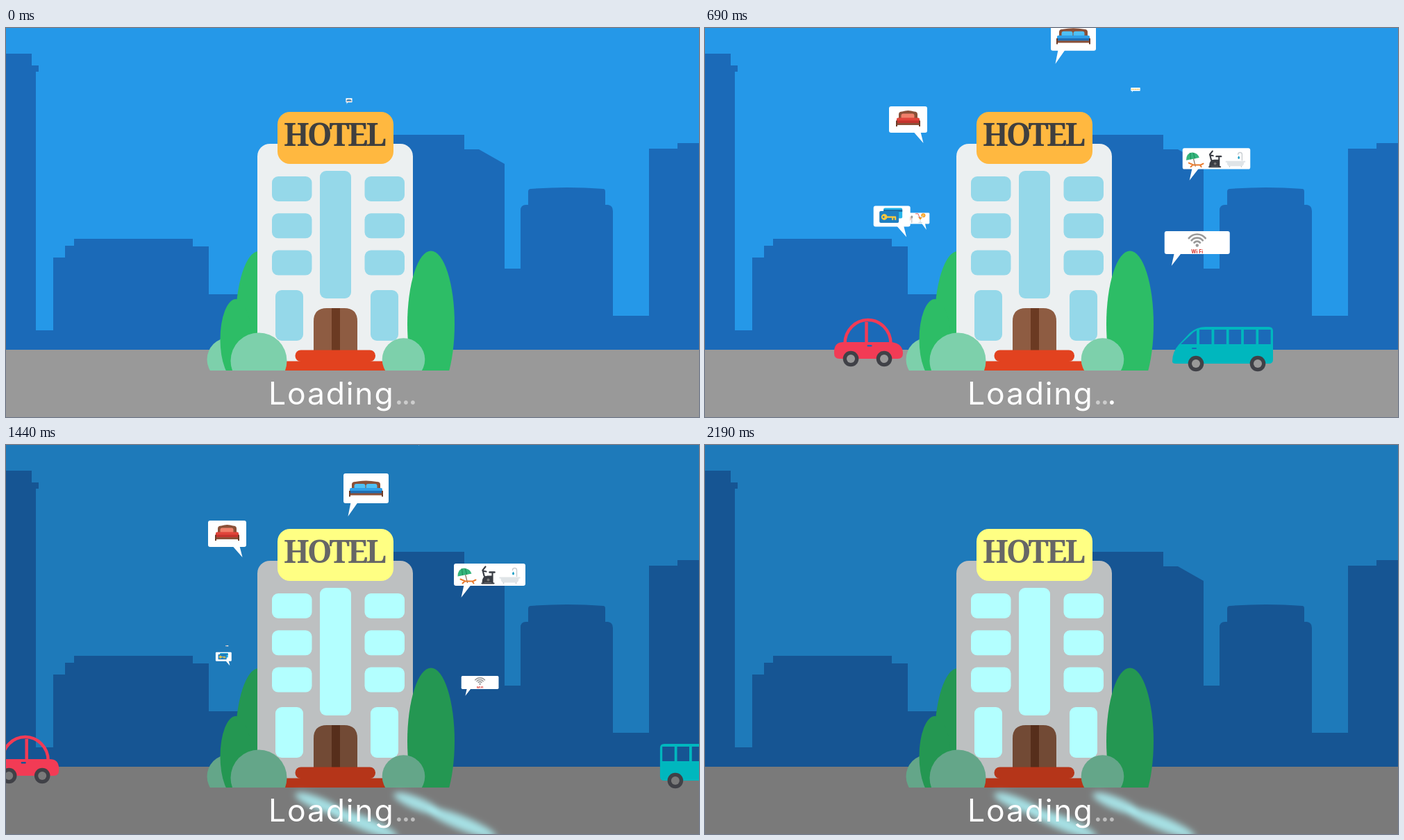
An HTML page for the animation above (2220 ms loop, 998x561 px).

```html
<!DOCTYPE html>
<html lang="en">
<head>
<meta charset="utf-8">
<title>Hotel loading</title>
<style>
html, body { margin: 0; width: 100%; height: 100%; overflow: hidden; }
svg { display: block; width: 100vw; height: 100vh; }
.sky { fill: var(--sky); }
.town { fill: var(--town); }
.ground { fill: var(--ground); }
.tree { fill: var(--tree); }
.bush { fill: var(--bush); }
.wall { fill: var(--wall); }
.step { fill: var(--step); }
.door { fill: var(--door); }
.slit { fill: var(--slit); }
.board { fill: var(--board); }
.tyre { fill: #404147; }
.name { fill: var(--name); font: bold 45px "Noto Serif", "Liberation Serif", serif; letter-spacing: -2.9px; }
.load { fill: #fff; font: 400 44.5px Inter, "Open Sans", sans-serif; letter-spacing: 1.8px; }
.dot { letter-spacing: -2.8px; }
.wifi { fill: #d8322a; font: bold 7px Inter, sans-serif; }
</style>
</head>
<body>
<svg viewBox="0 0 998 561" preserveAspectRatio="none">
  <defs>
    <filter id="blur" x="-20%" y="-40%" width="140%" height="180%"><feGaussianBlur stdDeviation="5"/></filter>
    <clipPath id="lawn"><rect width="998" height="494"/></clipPath>
  </defs>
  <rect class="sky" width="998" height="561"/>
  <path class="town" d="M0 37H37V54H47V63H43V436H68V331H85V314H98V304H269V315H292V384H400V154H660V175H681L718 196V347H741V263Q741 255 749 255H752V236Q752 232 756 232Q808 228 860 232Q863 232 863 236V255H867Q874 256 874 264V415H926V174H967V166H998V465H0Z"/>
  <rect class="ground" y="464" width="998" height="97"/>
  <g clip-path="url(#lawn)">
    <circle class="bush" cx="321" cy="478" r="31.5"/>
    <ellipse class="tree" cx="364" cy="427" rx="33.5" ry="105"/>
    <ellipse class="tree" cx="331" cy="449" rx="22.5" ry="58"/>
    <rect class="wall" x="362" y="167" width="224" height="340" rx="18"/>
    <ellipse class="tree" cx="612" cy="427" rx="34" ry="105.5"/>
    <g id="panes"></g>
    <path class="door" d="M443 465V423Q443 404 462 404H487Q506 404 506 423V465Z"/>
    <rect class="slit" x="469" y="404" width="12" height="61"/>
    <rect class="step" x="395" y="480.5" width="155" height="14"/>
    <rect class="step" x="416.5" y="464.5" width="115.5" height="16.5" rx="8"/>
    <circle class="bush" cx="364" cy="480" r="40.5"/>
    <circle class="bush" cx="572.5" cy="478" r="30.8"/>
  </g>
  <rect class="board" x="391" y="121" width="167" height="75" rx="18"/>
  <text class="name" x="400" y="170">HOTEL</text>
  <g id="glow" filter="url(#blur)" fill="#b2fbff"></g>
  <text class="load" x="378" y="543">Loading<tspan class="dot">.</tspan><tspan class="dot">.</tspan><tspan class="dot">.</tspan></text>
  <g id="car">
    <path d="M-34 -6A33 34 0 0 1 32 -6M-3 -37V-6" fill="none" stroke="#f23b55" stroke-width="4.5"/>
    <path d="M-49.5 5Q-49 -8 -36 -8H33Q49.5 -6 49.5 8Q49.5 16 42 16H-42Q-49.5 16 -49.5 8Z" fill="#f23b55"/>
    <rect class="town" x="-2" y="-4" width="7" height="2.5" rx="1"/>
  </g>
  <g id="bus"></g>
  <g id="bubbles"></g>
</svg>
<script>
const LOOP = 2220, POP = 250, DRIFT = 110, SHRINK = 150, RISE = .33;
const $ = id => document.getElementById(id);
const root = document.documentElement.style;
const clamp = v => Math.max(0, Math.min(1, v));
const mix = (a, b, u) => a + (b - a) * u;
const ease = u => u * u * (3 - 2 * u);
const repeat = (n, fn) => Array.from({ length: n }, (_, i) => fn(i)).join('');

const day = {
  sky: '2598e8', town: '1b6ab8', ground: '999999', tree: '2dbd66', bush: '7dd0ab', wall: 'ecf0f1',
  glass: '95d8e9', step: 'e2421f', door: '8e5c42', slit: '6b3a22', board: 'ffb840', name: '3f3f3f'
};
// at night all colours dim, lit things brighten
const lit = { glass: 1.2, board: 2.05, name: 1.62 };

const rect = (x, y, w, h, fill, r = 0) => `<rect x="${x}" y="${y}" width="${w}" height="${h}" rx="${r}" fill="${fill}"/>`;
const disc = (x, y, r, fill) => `<circle cx="${x}" cy="${y}" r="${r}" fill="${fill}"/>`;
const shape = (d, fill) => `<path d="${d}" fill="${fill}" fill-rule="evenodd"/>`;
const line = (d, color, w) => `<path d="${d}" fill="none" stroke="${color}" stroke-width="${w}" stroke-linecap="round"/>`;

const pane = (x, y, w, h) => rect(x, y, w, h, 'var(--glass)', 9);
$('panes').innerHTML = repeat(3, i => pane(383, 214 + 53.3 * i, 57.5, 36) + pane(516.5, 214 + 53.3 * i, 57.5, 36)) +
  pane(452, 206, 45, 184) + pane(388, 378, 40, 73) + pane(525, 378, 40, 73);

$('glow').innerHTML = repeat(4, i => {
  const low = i >> 1, x = 450 + 142 * (i % 2) + 64 * low, y = 517 + 28 * low;
  return `<ellipse rx="${36 + 18 * low}" ry="${9 + low}" opacity=".8" transform="translate(${x} ${y}) rotate(22)"/>`;
});

const wheel = (x, y) => `<circle class="tyre" cx="${x}" cy="${y}" r="11.3"/><circle class="ground" cx="${x}" cy="${y}" r="6"/>`;
$('car').innerHTML += wheel(-25.5, 16) + wheel(22.5, 16);
$('bus').innerHTML = shape('M-73 20Q-73 6 -64 -4L-48 -21Q-38 -30 -25 -30H66Q72 -30 72 -24V17Q72 23 66 23H-68Q-73 23 -73 20ZM-61 -5H-38V-25Q-42 -23 -46 -19Z' +
  repeat(5, i => `M${-34 + 21.3 * i} -5h17.5v-21h-17.5Z`), '#00b7be') +
  rect(-45, 0, 7, 2, 'var(--town)', 1) + wheel(-39, 23) + wheel(50, 23);

function bed(w, sheet, dark, pillow, count) {
  const pw = (2 * w - 15) / count;
  return shape(`M${4 - w} -4V-15q0 -4 5 -4 ${w - 9} -3 ${2 * w - 18} 0 5 0 5 4V-4Z`, '#8a5038') +
    repeat(count, i => rect(7.5 - w + pw * i, -16, pw - 1, 8, pillow, 3)) +
    rect(1 - w, -10, 2 * w - 2, 6, sheet, 2) + rect(1 - w, -6, 2 * w - 2, 4, dark) +
    rect(-w, -2.5, 2 * w, 3, '#8a5038') + rect(-w, -6, 2, 8.5, '#6d3b28') + rect(w - 2, -6, 2, 8.5, '#6d3b28');
}

function star(x, y, r) {
  const d = repeat(10, i => {
    const a = i * Math.PI / 5, q = i % 2 ? r * .45 : r;
    return `${i ? 'L' : 'M'}${x + q * Math.sin(a)} ${y - q * Math.cos(a)}`;
  });
  return shape(d + 'Z', '#f0a30a');
}

const beach = line('M-37 -17L-32 3', '#8a6a50', 1.2) + shape('M-46 -6Q-46 -17 -37 -18Q-28 -17 -26 -10Z', '#35b57c') +
  line('M-40 -17L-39 -8M-35 -17L-33 -9', '#1f8f5c', 1.2) + line('M-42 -2L-35 1H-24L-20 -1M-36 1L-39 4M-25 1L-23 4', '#e8792b', 2);
const bike = line('M-11 4H6M-9 3L-7 -6M-8 -7L-10 -15L-6 -20M-10 -14L-5 -13M4 -11V3', '#3a3d44', 2.2) +
  line('M0 -12H7', '#3a3d44', 2.5) + shape('M-11 3Q-11 -7 -3 -7H4V3Z', '#3a3d44') + disc(-2, -1, 2, '#777');
const bath = line('M39 -6V-15Q39 -18 36 -18Q33 -18 33 -15M20 3V4M38 3V4', '#c9ced2', 1.5) +
  shape('M14 -5H44V-3H42Q42 3 37 3H21Q16 3 16 -3H14Z', '#dfe4e7') + shape('M34 -13Q37 -9 34 -8Q31 -9 34 -13Z', '#1b9dc4');
const meal = line('M-33 -9V4M-35.5 -17V-11Q-33 -8 -30.5 -11V-17M-33 -17V-10M-5 -9V4', '#999', 1.5) +
  disc(-19, -8, 11, '#e9623f') + disc(-19, -8, 7.5, '#f47d58') + '<ellipse cx="-5" cy="-13" rx="3" ry="4.5" fill="#999"/>';
const drink = disc(30, -18, 6.5, '#f59a1f') + disc(30, -18, 4, '#ffc04d') +
  shape('M12 -15H30L21 -4Z', '#d5e5ee') + shape('M15 -12H27L21 -4Z', '#f8ab2b') +
  line('M7 -23H14L20 -9', '#e0392f', 1.7) + line('M21 -4V3M16 4H26', '#b9c9d2', 1.5);
const pass = rect(-12, -19.5, 27, 15, '#25b5ea', 2) + rect(-12, -17, 27, 3, '#1b6da5') + rect(-18, -15, 28, 17, '#1f7fc1', 2) +
  disc(-11, -6.5, 4.3, '#ffc93c') + disc(-12, -6.5, 1.4, '#1f7fc1') + line('M-7 -6.5H5M1 -6V-3M5 -6V-3', '#ffc93c', 2.2);
const arc = r => line(`M${-r * .77} ${-5 - r * .64}A${r} ${r} 0 0 1 ${r * .77} ${-5 - r * .64}`, '#999', 2.7);
const wifi = repeat(3, i => arc(5.5 + 5 * i)) + disc(0, -4.5, 2.2, '#999') + '<text class="wifi" text-anchor="middle" y="6.5">Wi Fi</text>';

// size: half width, half height with tail, body height; tail: x of tip
// laps: when it pops up and when it leaves, for each round
const bubbles = [
  { size: [32.5, 31, 43], tail: -26, from: [490, 111], home: [518.5, 72], drift: [12, 0], rise: true,
    laps: [[-35, 535], [985, 1555]], icon: bed(24.5, '#2f9fe8', '#1f6fb5', '#4fc0f5', 2) },
  { size: [27.5, 26.5, 38], tail: 22, from: [340, 162], home: [318.5, 135.5], drift: [-26, 4], rise: true,
    laps: [[90, 690], [1170, 1800]], icon: bed(17.5, '#e0443a', '#c4332d', '#f0806a', 1) },
  { size: [51.5, 24.5, 32], tail: -41, from: [655, 220], home: [696.5, 195.5], drift: [40, 1],
    laps: [[100, 682], [1180, 1792]], icon: beach + bike + bath },
  { size: [48, 25.5, 34], tail: -38, from: [618, 92], home: [632, 74.5], drift: [0, 0], rise: true,
    laps: [[655, 1140], [1735, 2002]], icon: repeat(5, i => star(-35 + 17.5 * i, -8, 8)) },
  { size: [49, 26, 34], tail: 39.5, from: [320, 291], home: [278, 265], drift: [-16, -1],
    laps: [[572, 1280], [1430, 1790]], icon: meal + drink },
  { size: [47, 25, 33], tail: -37, from: [662, 384], home: [698, 320], drift: [11, -2],
    laps: [[295, 700], [1297, 1800]], icon: wifi },
  { size: [26.5, 22.5, 30], tail: 21, from: [325, 321], home: [298, 292], drift: [-29, -13],
    laps: [[252, 695], [1332, 1797]], icon: pass }
];
$('bubbles').innerHTML = bubbles.map(({ size: [w, h, body], tail, icon }) => {
  const side = Math.sign(tail), root = body - h - 1, near = Math.abs(tail);
  const tip = shape(`M${side * (near - 4)} ${root}L${tail} ${h}L${side * (near - 14)} ${root}Z`, '#fff');
  return `<g>${rect(-w, -h, 2 * w, body, '#fff', 3)}${tip}${icon}</g>`;
}).join('');

function pose(b, t) {
  const [pop, leave] = b.laps[t < b.laps[1][0] ? 0 : 1];
  const grow = clamp((t - pop) / POP), away = Math.max(0, t - leave);
  const slide = ease(clamp((t - leave + DRIFT) / DRIFT));
  const [x, y] = b.home.map((v, i) => mix(b.from[i], v, grow) + b.drift[i] * slide);
  return b.rise ? [x, y - RISE * away, grow] : [x, y, grow * clamp(1 - away / SHRINK)];
}

function shade(hex, k) {
  return `rgb(${[0, 2, 4].map(i => Math.min(255, Math.round(parseInt(hex.slice(i, i + 2), 16) * k)))})`;
}

function drive(el, x, y, side, t, leave, speed) {
  const left = 1 - clamp(t / 350);
  const dx = side * (330 * left * left + speed * Math.max(0, t - leave));
  el.setAttribute('transform', `translate(${x + dx} ${y}) scale(${t < 1080 ? 1 : -1} 1)`);
}

const dots = document.querySelectorAll('.dot');
function draw(t) {
  const night = clamp((t - 900) / 150);
  for (const k in day) root.setProperty('--' + k, shade(day[k], mix(1, lit[k] || .8, night)));
  $('glow').setAttribute('opacity', night);
  drive($('car'), 235.5, 461, -1, t, 1080, .58);
  drive($('bus'), 746, 461, 1, t, 1140, .893);
  bubbles.forEach((b, i) => {
    const [x, y, s] = pose(b, t), el = $('bubbles').children[i];
    el.setAttribute('visibility', s > 0 && t < LOOP - 30 ? 'visible' : 'hidden');
    el.setAttribute('transform', `translate(${x} ${y}) scale(${s})`);
  });
  const beat = t % 740;
  dots.forEach((d, i) => {
    const dim = beat < 90 + 60 * i || beat >= 635 + 30 * i;
    d.setAttribute('fill-opacity', dim ? .5 : 1);
  });
}

const start = performance.now();
function tick(now) {
  const t = Math.max(0, now - start) % LOOP;
  draw(Math.floor(t / 30) * 30);
  requestAnimationFrame(tick);
}
draw(0);
requestAnimationFrame(tick);
</script>
</body>
</html>
```
